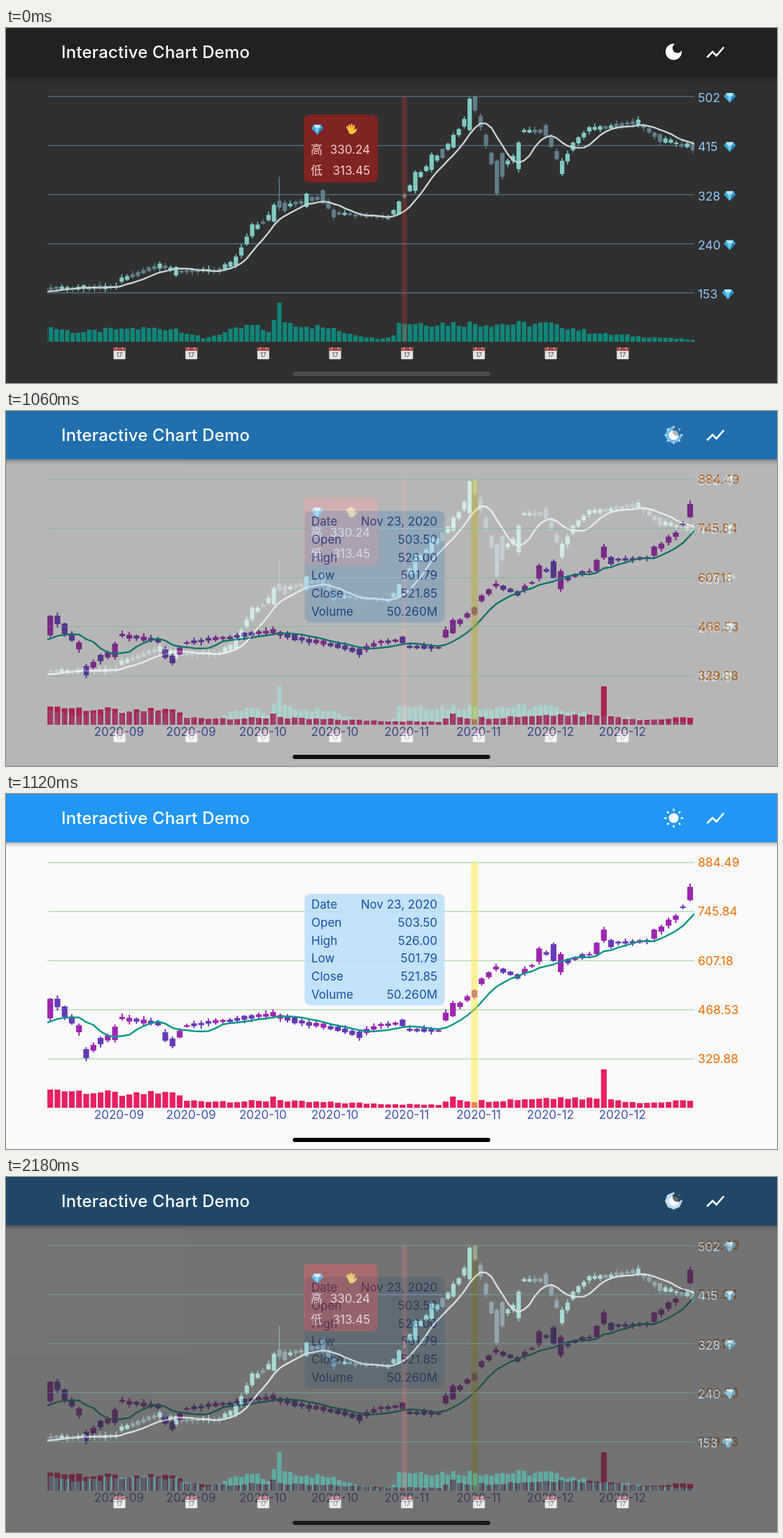
Write an HTML page that moves like this. It is 1101x508 px and loops after 2.24 s.

```html
<!DOCTYPE html>
<html lang="en">
<head>
<meta charset="utf-8">
<title>Interactive Chart Demo</title>
<style>
  html, body { margin: 0; width: 100%; height: 100%; overflow: hidden; background: #303030; }
  svg { position: absolute; left: 0; top: 0; width: 1101px; height: 508px; display: block; }
  text { font: 17px Inter, "Noto Sans CJK SC", "Noto Sans CJK JP", "Noto Sans CJK", sans-serif; }
  .title { font-size: 24px; font-weight: 500; letter-spacing: .2px; fill: #fff; }
  .price { font-size: 17.4px; }
  .day { font-size: 9px; fill: #444; }
  .end { text-anchor: end; }
  .mid { text-anchor: middle; }
  #light { animation: fade 2240ms step-end infinite; }
  #home { animation: home 2240ms step-end infinite; }
  @keyframes fade {
    0% { opacity: 0; }
    44.643% { opacity: .34; }
    47.321% { opacity: .67; }
    50% { opacity: 1; }
    94.643% { opacity: .67; }
    97.321% { opacity: .34; }
  }
  @keyframes home {
    0% { fill: #4e4e4e; }
    44.643% { fill: #1a1a1a; }
    47.321% { fill: #0e0e0e; }
    50% { fill: #000; }
    94.643% { fill: #0e0e0e; }
    97.321% { fill: #1a1a1a; }
  }
</style>
</head>
<body>
<svg viewBox="0 0 1101 508">
  <defs>
    <clipPath id="plot"><rect x="59" y="90" width="924" height="360"/></clipPath>
    <linearGradient id="shade" x2="0" y2="1">
      <stop offset="0" stop-opacity=".32"/>
      <stop offset=".4" stop-opacity=".12"/>
      <stop offset="1" stop-opacity="0"/>
    </linearGradient>
    <g id="gem">
      <path d="M3.5 0H13.5L17 4.8L8.5 14L0 4.8Z" fill="#3ba9e0"/>
      <path d="M3.5 0H13.5L11.5 4.8H5.5Z" fill="#b5e9fb"/>
      <path d="M5.5 4.8H11.5L8.5 14Z" fill="#74cdf2"/>
      <path d="M11.5 4.8H17L8.5 14Z" fill="#2488c6"/>
    </g>
    <g id="hand" fill="none" stroke="#fbc440" stroke-width="2.5" stroke-linecap="round">
      <path d="M4.5 9L2.2 4.5M6.3 8L5 2.2M8.8 8L8.6 1.6M11.2 8.5L12 3M12.5 12L15 8.2"/>
      <ellipse cx="8.5" cy="11" rx="4" ry="3.6" fill="#fbc440" stroke-width="1"/>
    </g>
    <g id="calendar">
      <rect width="17" height="17" rx="1.5" fill="#e3e3e3"/>
      <rect width="17" height="5" rx="1.5" fill="#a94a48"/>
      <path d="M4 0V2.5M13 0V2.5" stroke="#ddd" stroke-width="1.2"/>
      <text class="day mid" x="8.5" y="14.3">17</text>
    </g>
  </defs>
  <g id="dark"></g>
  <g id="light"></g>
  <text class="title" x="79" y="43">Interactive Chart Demo</text>
  <path d="M1001 42L1009 34L1014.5 39.5L1025 27.5" fill="none" stroke="#fff" stroke-width="2.6"/>
  <rect id="home" x="409.5" y="492" width="282" height="6" rx="3"/>
</svg>
<script>
const BASE = 449;
const LABEL_STEP = 102.67;
const gridY = i => 98 + 70.25 * i;

// Candles: [index, body top, height (negative = falling), wick top]; the rest follow the trend between them.
// Volumes: [index, bar height], interpolated.
const darkTheme = {
  page: '#303030', bar: '#212121', grid: '#557890', price: '#90caf9',
  up: '#80cbc4', down: '#607d8b', volume: '#11857a', trend: '#c6d2d3', wick: 1.4,
  x0: 56.5, step: 7.765, count: 120, earlier: 378, marked: 66, stripe: 'rgba(244,67,54,.22)',
  candles: [
    [0, 372, 2], [13, 369, 2], [14, 357, 6], [21, 337, 7], [24, 342, 12], [32, 344, -4], [35, 327, 13],
    [38, 281, 17], [40, 277, -3], [42, 253, 24], [43, 247, -10, 213], [44, 250, -12], [48, 237, 19],
    [51, 232, -19], [53, 260, -11], [63, 268, -6], [65, 248, 18], [66, 240, 1], [68, 206, 27],
    [71, 181, 22], [73, 173, -13], [75, 153, 18], [78, 101, 45], [79, 98, -20], [83, 190, -47],
    [84, 179, -34], [87, 164, 38], [88, 146, 3], [92, 139, -15], [95, 190, 19], [97, 164, 11],
    [100, 142, 6], [109, 131, 9], [113, 152, -11], [116, 164, 2], [119, 166, -9]
  ],
  volumes: [[0, 22], [6, 13], [14, 19], [24, 19], [29, 5], [38, 24], [41, 14], [42, 31], [43, 56], [44, 28],
    [52, 19], [61, 4], [64, 9], [65, 27], [94, 25], [101, 12], [119, 3]]
};

const lightTheme = {
  page: '#fafafa', bar: '#2196f3', grid: '#a5d6a7', price: '#ef6c00',
  up: '#9c27b0', down: '#673ab7', volume: '#e91e63', trend: '#009688', wick: 2,
  x0: 63.2, step: 10.267, count: 90, earlier: 331, marked: 59, stripe: 'rgba(255,235,59,.5)',
  candles: [
    [0, 293, 28], [1, 293, -12], [2, 304, -15], [4, 331, 10], [5, 365, -13], [7, 349, -9], [9, 333, 19],
    [10, 319, 3], [15, 326, -5], [16, 341, -12], [17, 350, -11], [19, 331, 2], [31, 312, 6],
    [34, 320, -8], [40, 333, -6], [43, 340, -9], [46, 329, 3], [49, 323, -9], [50, 336, -3],
    [54, 338, 2], [55, 313, 11], [56, 299, 19], [59, 281, 10], [60, 264, 8], [62, 247, 4],
    [65, 258, -6], [67, 245, 2], [68, 221, 19], [70, 215, -24], [71, 229, 26], [75, 229, 2],
    [76, 213, 16], [77, 194, 16], [78, 209, -10], [83, 209, -3], [84, 194, 13], [87, 174, 6],
    [88, 161, -2], [89, 133, 19]
  ],
  volumes: [[0, 26], [11, 19], [17, 22], [19, 10], [30, 9], [31, 16], [33, 9], [54, 4], [56, 16],
    [58, 9], [71, 15], [76, 13], [77, 55], [78, 12], [83, 7], [89, 10]]
};

const noise = n => { const v = Math.sin(n * 12.9898) * 43758.5453; return v - Math.floor(v); };
const rect = (x, y, w, h, fill, rx = 0) =>
  `<rect x="${x}" y="${y}" width="${w}" height="${h}" rx="${rx}" fill="${fill}"/>`;
const text = (x, y, value, fill, cls = '') =>
  `<text x="${x}" y="${y}" fill="${fill}" class="${cls}">${value}</text>`;
const use = (id, x, y) => `<use href="#${id}" x="${x}" y="${y}"/>`;
const repeat = (n, draw) => Array.from({ length: n }, (_, i) => draw(i)).join('');

function around(i, list) {
  const next = list.findIndex(p => p[0] >= i);
  const b = list[next];
  const a = b[0] === i ? b : list[next - 1];
  return { a, b, exact: a === b, part: a === b ? 0 : (i - a[0]) / (b[0] - a[0]) };
}

function volumeAt(i, list) {
  const { a, b, exact, part } = around(i, list);
  return exact ? a[1] : (a[1] + (b[1] - a[1]) * part) * (.8 + .4 * noise(i + 2));
}

function candleAt(i, list) {
  const { a, b, exact, part } = around(i, list);
  let [, top, size, high] = a;
  if (!exact) {
    const from = a[1] + Math.abs(a[2]) / 2;
    const to = b[1] + Math.abs(b[2]) / 2;
    const slope = (to - from) / (b[0] - a[0]);
    const height = 2 + 3 * noise(i + 3) + Math.abs(slope) * .5;
    const rising = Math.abs(slope) > 3 ? slope < 0 : noise(i + 7) > .6;
    top = from + (to - from) * part + 2 * noise(i + 5) - 1 - height / 2;
    size = rising ? height : -height;
    high = undefined;
  }
  const height = Math.abs(size);
  return {
    top, size, height,
    high: high ?? top - 1 - 4 * noise(i),
    low: top + height + 1 + 4 * noise(i + 9),
    close: size > 0 ? top : top + height
  };
}

// Seven-period moving average, extended to both plot edges.
function trendPath(t, candles) {
  const closes = [...Array(6).fill(t.earlier), ...candles.map(c => c.close)];
  const mean = candles.map((_, i) => closes.slice(i, i + 7).reduce((sum, v) => sum + v) / 7);
  const n = mean.length;
  const points = [2 * mean[0] - mean[1], ...mean, 2 * mean[n - 1] - mean[n - 2]];
  return 'M' + points.map((y, i) => `${t.x0 + (i - 1) * t.step},${y}`).join('L');
}

function chart(t) {
  const width = t.step * .8;
  const data = Array.from({ length: t.count }, (_, i) => candleAt(i, t.candles));
  const x = i => t.x0 + i * t.step;
  const bars = repeat(t.count, i => {
    const v = volumeAt(i, t.volumes);
    return rect(x(i) - width / 2, BASE - v, width, v, t.volume);
  });
  const candles = data.map((c, i) => {
    const color = c.size > 0 ? t.up : t.down;
    return rect(x(i) - t.wick / 2, c.high, t.wick, c.low - c.high, color) +
      rect(x(i) - width / 2, c.top, width, c.height, color);
  }).join('');
  const grid = repeat(5, i => rect(59, gridY(i) - .6, 924, 1.2, t.grid));
  const stripe = rect(x(t.marked - .47), 98, t.step * .95, BASE - 98, t.stripe);
  return rect(0, 0, 1101, 508, t.page) + rect(0, 69, 1101, 8, 'url(#shade)') + rect(0, 0, 1101, 69, t.bar) +
    `${grid}<g clip-path="url(#plot)">${bars}${candles}` +
    `<path d="${trendPath(t, data)}" fill="none" stroke="${t.trend}" stroke-width="2.4" stroke-linejoin="round"/></g>${stripe}`;
}

function darkExtras() {
  const ink = '#f6d0d2';
  const moon = '<path fill="#fff" d="M953.5 22.5A11.6 11.6 0 1 0 965 34Q965 33 964.8 32.2A7 7 0 1 1 955.2 22.7Z"/>';
  const prices = ['502', '415', '328', '240', '153'].map((p, i) =>
    text(988, gridY(i) + 8, p, darkTheme.price, 'price') +
    use('gem', p[0] === '1' ? 1022.5 : 1025, gridY(i) - 5)).join('');
  const days = repeat(8, i => use('calendar', 153.5 + i * LABEL_STEP, 457));
  const rows = [['高', '330.24'], ['低', '313.45']].map(([name, value], i) => {
    const y = 180 + i * 29.5;
    return text(435, y, name, ink) + text(520, y, value, ink, 'end');
  }).join('');
  const tip = rect(425, 124, 106, 97, '#7f2323', 8) + use('gem', 436, 138.5) + use('hand', 485, 137);
  return moon + prices + days + tip + rows;
}

function lightExtras() {
  const ink = '#174ea6';
  const rays = repeat(8, i => `<path d="M0-10V-13.4" transform="rotate(${i * 45})"/>`);
  const sun = '<g transform="translate(953.5 34.5)" stroke="#fff" stroke-width="2.3">' +
    `<circle r="7" fill="#fff" stroke="none"/>${rays}</g>`;
  const prices = ['884.49', '745.84', '607.18', '468.53', '329.88'].map((p, i) =>
    text(988, gridY(i) + 6, p, lightTheme.price, 'price')).join('');
  const months = repeat(8, i => {
    const month = String(9 + Math.floor(i / 2)).padStart(2, '0');
    return text(161.5 + i * LABEL_STEP, 465.3, `2020-${month}`, '#3f51b5', 'mid');
  });
  const rows = [['Date', 'Nov 23, 2020'], ['Open', '503.50'], ['High', '526.00'],
    ['Low', '501.79'], ['Close', '521.85'], ['Volume', '50.260M']].map(([name, value], i) => {
    const y = 164.2 + i * 25.75;
    return text(436, y, name, ink) + text(616, y, value, ink, 'end');
  }).join('');
  return sun + prices + months + rect(426.5, 143, 200, 159.5, 'rgba(187,222,251,.85)', 8) + rows;
}

document.getElementById('dark').innerHTML = chart(darkTheme) + darkExtras();
document.getElementById('light').innerHTML = chart(lightTheme) + lightExtras();
</script>
</body>
</html>
```
